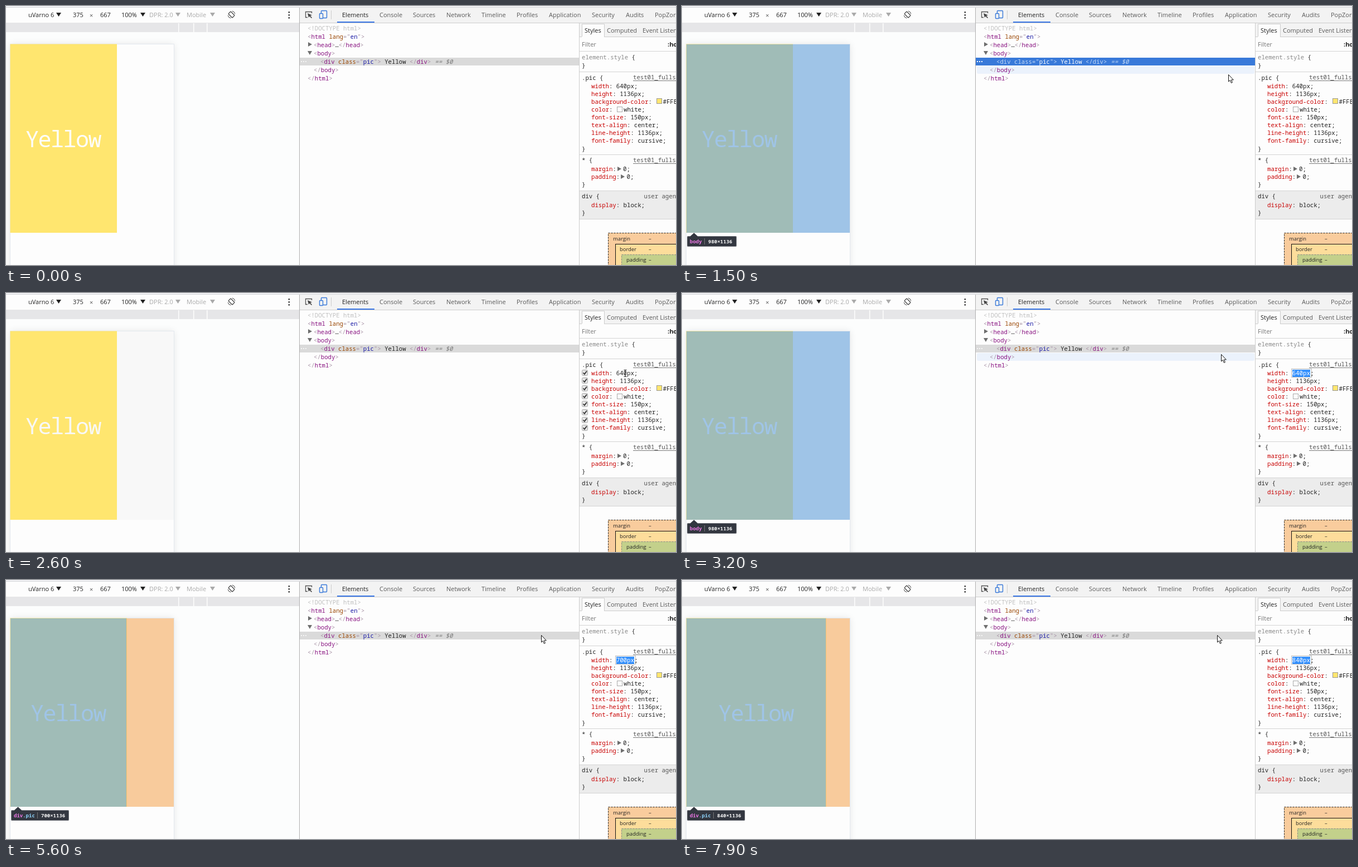
These frames come from a looping animation (1202 px wide and 466 px high, 8000 ms). An HTML page with a canvas:

```html
<!DOCTYPE html>
<html lang="en">
<head>
<meta charset="utf-8">
<title>Inspector</title>
<style>
html, body { margin: 0; width: 100%; height: 100%; overflow: hidden; background: #fdfdfd; }
canvas { display: block; }
</style>
</head>
<body>
<canvas id="stage" width="1202" height="466"></canvas>
<script>
const c = document.getElementById('stage').getContext('2d');
const LOOP = 8000, PITCH = 6.4, PAGE_X = 7.5, ZOOM = 0.2992;
const WHITE = '#fdfdfd', INK = '#222', LINE = '#ccc', BLUE = '#3879d9';
const PUNCT = '#a894a6', TAG = '#881280', ATTR = '#994500', VALUE = '#1a1aa6', PROP = '#c80000';
const UI = '11px "Open Sans", "Noto Sans", sans-serif';
const SMALL = '9.4px "Open Sans", "Noto Sans", sans-serif';
const MONO = '10.667px "Noto Sans Mono", "Liberation Mono", monospace';
const TIP = 'bold 9px "Noto Sans Mono", "Liberation Mono", monospace';
const BIG = '40px "Noto Sans Mono", "Liberation Mono", monospace';

// Pointer keys: time, x, y
const PATH = [
  [400, 1192, 31], [600, 923, 83], [800, 912, 98], [900, 912, 98], [1000, 912, 97],
  [1200, 912, 97], [1300, 918, 99], [1500, 980, 123], [1800, 982, 123], [2100, 1116, 143],
  [2300, 1112, 146], [2600, 1111, 144], [2800, 1111, 144], [3200, 967, 110], [3500, 960, 99]
];
// Width edits: time, new value
const EDITS = [
  [4600, 650], [4900, 660], [5000, 670], [5300, 680], [5400, 690], [5600, 700],
  [5800, 710], [6000, 720], [6400, 740], [6500, 760], [6600, 780], [6900, 790],
  [7100, 800], [7300, 810], [7500, 820], [7700, 830], [7900, 840]
];

function box(x, y, w, h, fill) {
  c.fillStyle = fill;
  c.fillRect(x, y, w, h);
}
function frame(x, y, w, h, color, dash = []) {
  c.strokeStyle = color;
  c.lineWidth = 1;
  c.setLineDash(dash);
  c.strokeRect(x + 0.5, y + 0.5, w, h);
  c.setLineDash([]);
}
function text(s, x, y, color = INK, font = UI) {
  c.font = font;
  c.fillStyle = color;
  c.fillText(s, x, y);
}
function poly(points, fill, stroke) {
  c.beginPath();
  points.forEach(([x, y]) => c.lineTo(x, y));
  c.closePath();
  if (fill) { c.fillStyle = fill; c.fill(); }
  if (stroke) { c.strokeStyle = stroke; c.lineWidth = 1; c.stroke(); }
}
function line(points, color, width = 1) {
  c.beginPath();
  points.forEach(([x, y]) => c.lineTo(x, y));
  c.strokeStyle = color;
  c.lineWidth = width;
  c.stroke();
}
function round(x, y, w, h, r, fill, stroke) {
  c.beginPath();
  c.roundRect(x, y, w, h, r);
  if (fill) { c.fillStyle = fill; c.fill(); }
  if (stroke) { c.strokeStyle = stroke; c.stroke(); }
}
const down = (x, y, color, w = 9, h = 7) => poly([[x, y], [x + w, y], [x + w / 2, y + h]], color);
const right = (x, y, color = '#6e6e6e') => poly([[x, y], [x + 7, y + 4], [x, y + 8]], color);

// Coloured monospace runs: text, colour, text, colour ...
function code(x, y, ...runs) {
  for (let i = 0; i < runs.length; i += 2) {
    text(runs[i], x, y, runs[i + 1], MONO);
    x += runs[i].length * PITCH;
  }
}
function tag(x, y, name) {
  const open = name[0] === '/' ? '</' : '<';
  code(x, y, open, PUNCT, name.replace('/', ''), TAG, '>', PUNCT);
}

function pointer(t) {
  if (t < PATH[0][0]) return null;
  const i = PATH.findIndex(k => k[0] > t);
  if (i < 0) return PATH[PATH.length - 1].slice(1);
  const [t0, x0, y0] = PATH[i - 1], [t1, x1, y1] = PATH[i];
  const f = (t - t0) / (t1 - t0);
  return [Math.round(x0 + (x1 - x0) * f), Math.round(y0 + (y1 - y0) * f)];
}
function hoverAt(p) {
  if (!p) return '';
  const [x, y] = p;
  if (x > 1028) return y > 118 && y < 267 ? 'rule' : '';
  if (y >= 78 && y < 93) return 'body';
  if (y >= 93 && y < 108) return 'div';
  return y >= 108 && y < 125 ? 'end' : '';
}

function deviceBar() {
  box(0, 0, 1202, 2, '#f4f4f6');
  box(0, 2, 1202, 1, '#d3d5d8');
  text('uVarno 6', 40, 20);
  down(90, 12, INK);
  text('375', 120, 20);
  text('×', 150, 21, '#555');
  text('667', 169, 20);
  text('100%', 207, 20);
  down(241, 12, INK);
  text('DPR: 2.0', 257, 20, '#aaa');
  down(304, 12, '#aaa');
  text('Mobile', 324, 20, '#aaa');
  down(366, 12, '#aaa');
  c.save();
  c.translate(404.5, 15.5);
  c.rotate(-Math.PI / 4);
  c.lineWidth = 1.3;
  round(-3, -5, 6, 10, 1, null, '#444');
  c.restore();
  c.strokeStyle = '#444';
  for (const a of [-1.4, 1.75]) {
    c.beginPath();
    c.arc(404.5, 15.5, 6.5, a, a + 1.2);
    c.stroke();
  }
  for (const y of [10, 15, 20]) box(506.5, y, 2.6, 2.6, '#444');
  box(0, 30, 526, 17, '#e6e6e8');
  for (const x of [309, 336, 360]) box(x, 31, 1.5, 16, WHITE);
}

function tooltip(hover, width) {
  const div = hover === 'div', split = div ? 57 : 41, w = div ? 104 : 89;
  const dark = '#333740', rim = 'rgba(255,255,255,.3)';
  round(9, 414, w, 19, 2, dark);
  c.lineWidth = 1;
  round(9.5, 414.5, w - 1, 18, 2, null, rim);
  poly([[14, 415], [21.5, 408], [29, 415]], dark);
  line([[14, 414.5], [21.5, 408], [29, 414.5]], rim);
  text(div ? 'div' : 'body', 14, 427, '#ee78e6', TIP);
  if (div) text('.pic', 30.2, 427, '#8ed3fb', TIP);
  box(split - 1, 418, 1, 11, '#777');
  text((div ? width : 980) + '×1136', split + 6, 427, '#f4f4f4', TIP);
}

function page(t, hover, width) {
  const shown = ['body', 'div', 'end'].includes(hover);
  const span = width * ZOOM, edge = Math.floor(PAGE_X + span), last = 301, bottom = 408;
  const paper = t >= 1900 && !shown ? '#f8f8f8' : WHITE;
  box(0, 47, 526, 419, '#fcfdfd');
  c.shadowColor = 'rgba(0,0,0,.1)';
  c.shadowBlur = 12;
  box(8, 69, 293, 420, WHITE);
  c.shadowColor = 'transparent';
  frame(7, 68, 294, 420, '#e3e8ee');
  box(8, 69, last - 8, bottom - 69, paper);
  box(PAGE_X, 68.5, span, bottom - 68.5, '#ffe66f');
  c.textAlign = 'center';
  [...'Yellow'].forEach((ch, i) =>
    text(ch, PAGE_X + span / 2 + (i - 2.5) * 22.5, 254, paper, BIG));
  c.textAlign = 'left';
  if (!shown) return;
  const content = 'rgba(111,168,220,.66)', margin = 'rgba(246,178,107,.66)';
  const inner = hover === 'div' ? edge : last;
  box(8, 69, inner - 8, bottom - 69, content);
  box(inner, 69, last - inner, bottom - 69, margin);
  tooltip(hover, width);
}

function tabs() {
  box(527, 3, 675, 27, '#f3f3f3');
  box(527, 30, 675, 1, LINE);
  line([[541, 20.5], [537.5, 20.5], [537.5, 10.5], [548.5, 10.5], [548.5, 13]], '#555', 1.3);
  poly([[541, 13], [549, 16.5], [546, 17.5], [549, 21], [548, 22], [544.5, 18.5], [543, 21]], '#444');
  c.lineWidth = 1.4;
  round(565.5, 8.5, 10, 13, 1, null, BLUE);
  round(562.5, 13.5, 6, 9, 1, '#f3f3f3', BLUE);
  box(583, 8, 1, 16, LINE);
  const names = [
    ['Elements', 603], ['Console', 670], ['Sources', 730], ['Network', 790], ['Timeline', 853],
    ['Profiles', 916], ['Application', 974], ['Security', 1051], ['Audits', 1112], ['PopZorb', 1164]
  ];
  names.forEach(([s, x], i) => text(s, x, 20, i ? '#5a5a5a' : INK));
  box(594, 28, 67, 2, '#3b78e7');
}

function tree(t, hover) {
  const active = t >= 1300 && t < 2400;
  box(527, 31, 501, 435, WHITE);
  if (hover === 'body') {
    round(529, 78, 498, 14, 3, '#ebf2fc');
    box(545, 108, 1, 14, '#e2e2e2');
  }
  if (hover === 'end') round(529, 108, 498, 14, 3, '#ebf2fc');
  box(527, 93, 501, 14, active ? BLUE : '#dadada');
  for (const x of [529, 533, 537]) box(x, 99, 2, 2, active ? '#fff' : '#f6f6f6');
  code(541, 44, '<!DOCTYPE html>', '#c0c0c0');
  code(541, 59, '<', PUNCT, 'html ', TAG, 'lang', ATTR, '="', PUNCT, 'en', VALUE, '">', PUNCT);
  right(542, 65);
  code(552, 74, '<', PUNCT, 'head', TAG, '>', PUNCT, '…', INK, '</', PUNCT, 'head', TAG, '>', PUNCT);
  down(541, 81, '#6e6e6e', 8, 7);
  tag(552, 89, 'body');
  const pick = (color, lit = '#c4daf7') => active ? lit : color;
  const p = pick(PUNCT), n = pick(TAG);
  code(564, 104, '<', p, 'div ', n, 'class', pick(ATTR), '="', p, 'pic', pick(VALUE, '#fff'), '">', p,
    ' Yellow ', pick(INK, '#fff'), '</', p, 'div', n, '>', p);
  text('== $0', 769.6, 104, pick('#777'), 'italic ' + MONO);
  tag(552, 119, '/body');
  tag(541, 134, '/html');
}

function prop(y, name, value, x = 1050 + (name.length + 2) * PITCH) {
  code(1050, y, name, PROP, ':', INK);
  text(value, x, y, INK, MONO);
}
function link(y) {
  text('test01_fullscreen', 1125, y, '#555', MONO);
  box(1125, y + 2, 77, 1, '#777');
}
function checkbox(y) {
  c.lineWidth = 1;
  round(1033.5, y + 0.5, 10, 10, 2, '#e4e4e4', '#a8a8a8');
  line([[1035.5, y + 5.5], [1037.8, y + 8], [1042, y + 2.5]], '#333', 1.8);
}

function styles(t, hover, width) {
  box(1028, 31, 174, 435, WHITE);
  box(1029, 31, 173, 24, '#f3f3f3');
  box(1029, 55, 173, 1, LINE);
  box(1033, 32, 40, 24, WHITE);
  line([[1033.5, 55], [1033.5, 32.5], [1073.5, 32.5], [1073.5, 55]], LINE);
  text('Styles', 1038, 48);
  text('Computed', 1078, 48, '#5a5a5a');
  text('Event Listeners', 1142, 48, '#5a5a5a');
  text('Filter', 1033, 73, '#777');
  text(':hov', 1187, 73, INK, 'bold ' + UI);
  box(1029, 332, 173, 51, '#ececec');
  for (const y of [81, 118, 267, 332, 383]) box(1029, y, 173, 1, '#d4d4d4');
  box(1028, 31, 1, 435, LINE);

  code(1033, 96, 'element.style', '#888', ' {', INK);
  for (const y of [111, 261, 325, 376]) code(1033, y, '}', INK);

  code(1033, 133, '.pic {', INK);
  link(132);
  prop(148, 'width', width + 'px;');
  prop(162, 'height', '1136px;');
  prop(176, 'background-color', '#FFE66F;', 1178.5);
  box(1167, 166, 10, 10, '#ffe66f');
  frame(1167, 166, 9, 9, '#999');
  prop(190, 'color', 'white;', 1108);
  frame(1096, 181, 9, 9, '#aaa');
  prop(204, 'font-size', '150px;');
  prop(218, 'text-align', 'center;');
  prop(232, 'line-height', '1136px;');
  prop(246, 'font-family', 'cursive;');
  if (hover === 'rule') for (let i = 0; i < 8; i++) checkbox(Math.round(138 + i * 14.1));
  if (t >= 2700) {
    box(1093, 136, 37, 16, '#fff');
    frame(1093, 136, 36, 15, '#bbb');
    box(1095, 138, 32, 13, '#3390ff');
    text(width + 'px', 1094.8, 148, '#fff', MONO);
    text(';', 1127, 148, INK, MONO);
  }

  code(1033, 281, '* {', INK);
  link(281);
  prop(297, 'margin', '0;', 1107);
  right(1097, 289);
  prop(311, 'padding', '0;', 1113.5);
  right(1103, 303);

  code(1033, 346, 'div {', INK);
  text('user agent stylesheet', 1144.5, 346, '#555', MONO);
  prop(362, 'display', 'block;');

  box(1080, 408, 122, 58, '#f9cc9d');
  frame(1080, 408, 140, 80, '#222', [3, 2]);
  box(1093, 428, 109, 38, '#fddd9b');
  frame(1093, 428, 120, 50, '#111');
  box(1104, 447, 98, 19, '#c3d08b');
  frame(1104, 447, 110, 40, '#888', [3, 2]);
  [['margin', 1089, 422], ['border', 1101, 441], ['padding', 1113, 460]].forEach(([s, x, y]) => {
    text(s, x, y, INK, SMALL);
    text('–', 1153, y, INK, SMALL);
  });
}

function drawPointer([x, y], hover) {
  if (hover === 'rule' && x > 1045) {
    line([[x - 2.5, y - 5.5], [x + 2.5, y - 5.5]], INK);
    line([[x - 2.5, y + 6.5], [x + 2.5, y + 6.5]], INK);
    line([[x, y - 5.5], [x, y + 6.5]], INK);
    return;
  }
  const shape = [[0, 0], [0, 12.5], [2.8, 10], [4.9, 15], [6.9, 14], [4.9, 9.4], [8.8, 9.4]];
  poly(shape.map(([a, b]) => [x + a + 0.5, y + b + 0.5]), '#fff', '#111');
}

function draw(now) {
  const t = Math.floor(now % LOOP / 100) * 100;
  const at = pointer(t), hover = hoverAt(at);
  const width = EDITS.reduce((w, [when, value]) => t >= when ? value : w, 640);
  box(0, 0, 1202, 466, WHITE);
  page(t, hover, width);
  deviceBar();
  tabs();
  tree(t, hover);
  styles(t, hover, width);
  box(526, 3, 1, 463, '#b0b0b0');
  if (at) drawPointer(at, hover);
}

let start;
function tick(now) {
  start ??= now;
  draw(now - start);
  requestAnimationFrame(tick);
}
requestAnimationFrame(tick);
</script>
</body>
</html>
```
